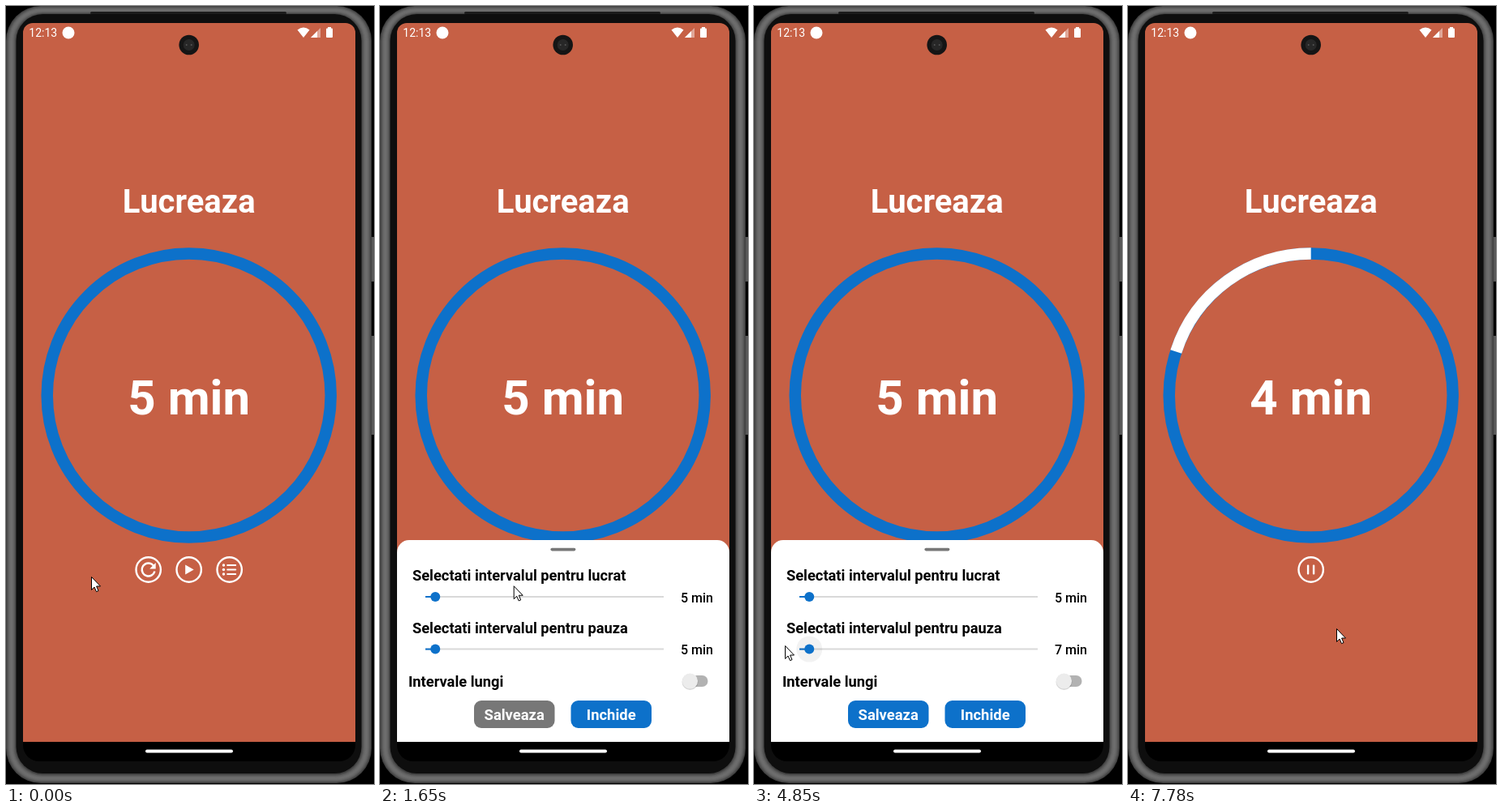
Write an HTML page with a canvas that moves like this. It is 454 px wide and 960 px high and loops after 8 s.

```html
<!DOCTYPE html>
<html lang="ro">
<head>
<meta charset="utf-8">
<title>Timer</title>
<style>
html, body { margin: 0; width: 100%; height: 100%; overflow: hidden; background: #000; }
canvas { display: block; }
</style>
</head>
<body>
<canvas id="stage" width="454" height="960"></canvas>
<script>
const LOOP = 8000, BLUE = '#0d71ca', CLAY = '#c66045', GREY = '#777';
const CX = 225.7, SHEET_TOP = 659, LABEL_LAG = 100;
const OPEN_AT = 720, CLOSE_AT = 5810, CLOSED_AT = 5910, RUN_AT = 6300, MINUTE_AT = 7360;
const c = document.getElementById('stage').getContext('2d');

const workDrag = { start: 2400, end: 3400, reach: 5 };
const pauseDrag = { start: 4090, end: 4800, reach: 15 };

// Pointer moves: start, end, x, y of the place reached.
const moves = [
  [100, 500, 285, 700], [760, 2400, 72, 727], [2400, 2640, 83, 726], [2640, 3400, 60, 728],
  [3400, 3920, 67, 787], [4090, 4300, 95, 789], [4400, 4850, 38, 789], [4950, 5700, 290, 876],
  [5710, 5800, 290, 831], [5910, 6250, 222, 696], [6450, 6660, 268, 773],
  [6960, 7090, 254, 778], [7630, 7780, 257, 768]
];

const progress = (t, from, to) => Math.min(1, Math.max(0, (t - from) / (to - from)));
const smooth = p => p * p * (3 - 2 * p);

// A quick pull to the right and a slower return to five minutes.
const minutes = (drag, t) => Math.round(
  5 + drag.reach * Math.sin(Math.PI * Math.sqrt(progress(t, drag.start, drag.end))));

const haloAlpha = (drag, t) => .16 *
  progress(t, drag.start + 100, drag.start + 200) * (1 - progress(t, drag.end, drag.end + 75));

function box(x, y, w, h, r, fill) {
  c.beginPath();
  c.roundRect(x, y, w, h, r);
  c.fillStyle = fill;
  c.fill();
}

function disc(x, y, r, fill) {
  c.beginPath();
  c.arc(x, y, r, 0, 7);
  c.fillStyle = fill;
  c.fill();
}

function ring(x, y, r, width, color, from = 0, to = Math.PI * 2) {
  c.beginPath();
  c.arc(x, y, r, from, to);
  c.lineWidth = width;
  c.strokeStyle = color;
  c.stroke();
}

function shape(path, fill, stroke) {
  const p = new Path2D(path);
  c.fillStyle = fill;
  c.fill(p);
  if (stroke) {
    c.lineWidth = 1;
    c.strokeStyle = stroke;
    c.stroke(p);
  }
}

function text(str, x, y, size, weight, color, align = 'left') {
  c.font = `${weight} ${size}px Roboto, sans-serif`;
  c.textAlign = align;
  c.fillStyle = color;
  c.fillText(str, x, y);
}

function drawPhone() {
  c.fillStyle = '#000';
  c.fillRect(0, 0, 454, 960);
  box(448, 285, 8, 55, 2, '#585858');
  box(448, 407, 8, 122, 2, '#585858');
  // The metal rim is a stack of shells, brightest in the middle.
  for (let d = 0; d < 13; d++) {
    const g = 50 + 60 * Math.sin(Math.PI * (d + 1) / 14);
    box(d, d * .8, 451 - 2 * d, 959 - 1.7 * d, 43 - d * .8, `rgb(${g},${g},${g})`);
  }
  box(12.5, 10, 426, 937, 33, '#0e0e0e');
  box(104, 7, 242, 3, 2, '#1c1c1c');
  box(21, 21, 410, 911, [12, 12, 20, 20], '#000');
  box(172, 917.5, 108, 4, 2, '#fff');
}

function drawStatusBar() {
  text('12:13', 28.3, 38, 14, 400, '#fff');
  disc(77, 33, 7.5, '#fff');
  shape('M367 39L359.5 29.5Q367 23.5 374.5 29.5Z', '#fff');
  shape('M376 39L388 27V39Z', 'rgba(255,255,255,.45)');
  shape('M376 39L384 31V39Z', '#fff');
  box(395, 27.5, 8, 11.5, 1, '#fff');
  box(397, 26, 4, 2, 0, '#fff');
  disc(CX, 48, 12.3, '#151515');
  disc(CX, 48, 7, '#272727');
  for (const side of [-3, 3]) disc(CX + side, 48, 1, '#555');
}

function icon(x, drawGlyph) {
  c.save();
  c.translate(x, 695.5);
  ring(0, 0, 15.2, 2.4, '#fff');
  drawGlyph();
  c.restore();
}

function drawControls(running) {
  if (running) {
    icon(CX, () => {
      for (const x of [-4.8, 2.2]) box(x, -6, 2.4, 12, 1, '#fff');
    });
    return;
  }
  icon(CX - 50, () => {
    ring(0, 0, 8, 2.4, '#fff', .25, 5.6);
    shape('M9 -8.5V-1H1.5Z', '#fff');
  });
  icon(CX, () => shape('M-4.5 -6L6 0L-4.5 6Z', '#fff'));
  icon(CX + 50, () => {
    for (const y of [-5.5, 0, 5.5]) {
      disc(-7.2, y, 1.7, '#fff');
      box(-3.5, y - 1.1, 12, 2.2, 1, '#fff');
    }
  });
}

function drawSlider(label, y, drag, t) {
  const shown = minutes(drag, t - LABEL_LAG);
  const end = shown >= 10 ? 341 : 350;
  const knob = 56 + minutes(drag, t) / 120 * (end - 56);
  text(label, 40, y - 20, 18.3, 700, '#000');
  box(56, y - 1, end - 56, 2, 0, '#d9d9d9');
  box(56, y - 1, knob - 56, 2, 0, BLUE);
  disc(knob, y, 16, `rgba(0,0,0,${haloAlpha(drag, t)})`);
  disc(knob, y, 6, BLUE);
  text(shown + ' min', 411, y + 6.5, 16, 500, '#000', 'right');
  return shown !== 5;
}

function drawButton(label, x, color) {
  box(x, 198, 99.5, 34, 9, color);
  text(label, x + 49.7, 222, 18.4, 700, '#fff', 'center');
}

function drawSheet(t) {
  if (t < OPEN_AT || t >= CLOSED_AT) return;
  const opening = 250 * Math.exp((OPEN_AT - t) / 56);
  const closing = t >= CLOSE_AT ? 172 : 0;

  c.save();
  c.beginPath();
  c.rect(21, 21, 410, 887);
  c.clip();
  c.translate(0, SHEET_TOP + opening + closing);
  box(21, 0, 410, 300, [15, 15, 0, 0], '#fff');
  box(CX - 15.3, 9.8, 31, 3.6, 2, GREY);
  const workChanged = drawSlider('Selectati intervalul pentru lucrat', 70, workDrag, t);
  const pauseChanged = drawSlider('Selectati intervalul pentru pauza', 134.6, pauseDrag, t);
  text('Intervale lungi', 35, 180.5, 18.3, 700, '#000');
  box(375, 167, 29.5, 14, 7, '#b2b2b2');
  disc(382.5, 175, 10, 'rgba(0,0,0,.16)');
  disc(382.5, 174, 9.6, '#ececec');
  drawButton('Salveaza', 116, workChanged || pauseChanged ? BLUE : GREY);
  drawButton('Inchide', 235.5, BLUE);
  c.restore();
}

function drawCursor(t) {
  let x = 105, y = 704;
  for (const [start, end, toX, toY] of moves) {
    const k = smooth(progress(t, start, end));
    x += (toX - x) * k;
    y += (toY - y) * k;
  }
  c.save();
  c.translate(x, y);
  shape('M.5 .5V16.5L4 13L6.5 18.7L9 17.6L6.6 12H11.5Z', '#fff', '#000');
  c.restore();
}

function draw(now) {
  const t = now % LOOP, minutePassed = t >= MINUTE_AT;
  drawPhone();
  box(21, 21, 410, 887, [12, 12, 0, 0], CLAY);
  drawStatusBar();
  text('Lucreaza', CX, 255, 40, 700, '#fff', 'center');
  ring(CX, 480.5, 175, 14.5, BLUE);
  if (minutePassed) ring(CX, 480.5, 175, 14.5, '#fff', -Math.PI * .9, -Math.PI / 2);
  text(minutePassed ? '4 min' : '5 min', CX, 504, 60, 700, '#fff', 'center');
  drawControls(t >= RUN_AT);
  drawSheet(t);
  drawCursor(t);
  requestAnimationFrame(draw);
}
requestAnimationFrame(draw);
</script>
</body>
</html>
```
